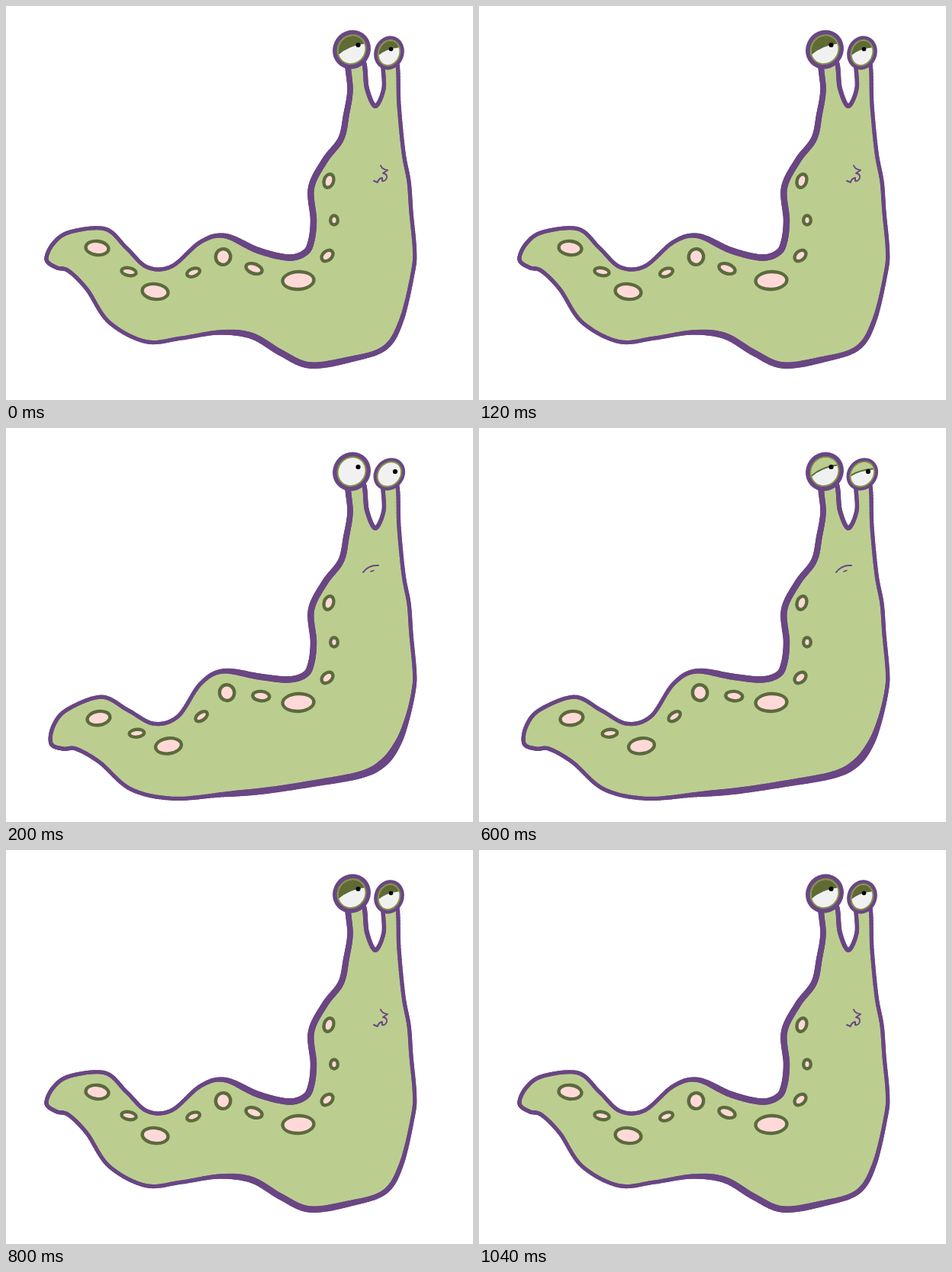
Write an HTML page with a canvas that moves like this. It is 612x516 px and loops after 1.2 s.

```html
<!DOCTYPE html>
<html lang="en">
<head>
<meta charset="utf-8">
<title>Slug</title>
<style>
html, body { margin: 0; width: 100%; height: 100%; overflow: hidden; background: #fff; }
canvas { display: block; }
</style>
</head>
<body>
<canvas id="stage" width="612" height="516"></canvas>
<script>
const ctx = document.getElementById('stage').getContext('2d');
const PURPLE = '#6a4684', GREEN = '#bbce90', OLIVE = '#5b6a3c', PINK = '#ffd9d7', RIM = '#809247', WHITE = '#f1f1f1';

// Key points of the outline, clockwise from the neck
const head = [
  [400,308],[403,280],[400,238],[418,202],[439,174],[446,142],[451,110],[449,72],[468,72],[473,108],
  [484,131],[495,108],[495,72],[512,72],[515,130],[521,192],[528,230],[531,270],[535.5,320]
];
const archedBelly = [[533,350],[518,412],[496,448],[450,463],[398,470.5],[360,454],[322,432],[280,427.5],[230,435]];
const flatBelly = [[534,345],[526,380],[514,412],[495,438],[465,454],[400,466],[340,475],[285,480]];
const tail = [
  [183,439.5],[135,414],[106,371],[82,347],[66,342.5],[53,332],[62,311],[84,296],[130,292],
  [158,317],[185,342],[217,341],[255,309],[287,301],[330,320],[370,329.5],[392,323]
];
// x, y, radii, tilt in degrees
const spots = [
  [423,229,6.2,9,18],[430,280.5,4.8,6,0],[421,327,8.5,6,-42],[383,359.5,20.5,11.5,-3],
  [119.5,317,15,9,6],[161,348,9.7,5,10],[195.5,374,17,10,7],[245.5,349,8.8,5,-20],
  [284.5,328.5,9.7,10.4,10],[325,344,11,6.2,20]
];

// Swing everything left of the hinge down by about 15 degrees
const HINGE = [351, 310], SWING = 0.2725;
const lower = ([x, y, rx, ry, tilt]) => x > HINGE[0] ? [x, y, rx, ry, tilt] :
  [x + SWING * (y - HINGE[1]), y + SWING * (HINGE[0] - x), rx, ry, tilt - 15];

// Cyclic Catmull-Rom spline
function smooth(pts, steps = 14) {
  const out = [], n = pts.length;
  for (let i = 0; i < n; i++) {
    const [a, b, c, d] = [-1, 0, 1, 2].map(k => pts[(i + k + n) % n]);
    for (let s = 0; s < steps; s++) {
      const t = s / steps;
      out.push([0, 1].map(k => b[k] + t / 2 * (c[k] - a[k] +
        t * (2 * a[k] - 5 * b[k] + 4 * c[k] - d[k] + t * (3 * (b[k] - c[k]) + d[k] - a[k])))));
    }
  }
  return out;
}

const arched = { outline: smooth([...head, ...archedBelly, ...tail]), spots, heel: 1.5 };
const flat = { outline: smooth([...head, ...flatBelly, ...tail.map(lower)]), spots: spots.map(lower), heel: 5 };

// The line swells around the middle and at the lower right corner
const penWidth = (x, y, heel) =>
  5.2 + 3.2 / (1 + ((x - 375) / 85) ** 8) + heel * Math.exp(-((x - 498) ** 2 + (y - 436) ** 2) / 2500);

function ellipse(x, y, rx, ry, deg, fill) {
  ctx.beginPath();
  ctx.ellipse(x, y, rx, ry, deg * Math.PI / 180, 0, 2 * Math.PI);
  ctx.fillStyle = fill;
  ctx.fill();
}

function line(path, color, width) {
  ctx.strokeStyle = color;
  ctx.lineWidth = width;
  ctx.stroke(new Path2D(path));
}

function drawBody({ outline, spots, heel }) {
  ctx.fillStyle = GREEN;
  ctx.fill(new Path2D('M' + outline.join('L')));
  outline.forEach(([x, y], i) => {
    line(`M${x} ${y}L${outline[(i + 1) % outline.length]}`, PURPLE, penWidth(x, y, heel));
  });
  for (const [x, y, rx, ry, tilt] of spots) {
    ellipse(x, y, rx + 2.2, ry + 2.2, tilt, OLIVE);
    ellipse(x, y, rx - 2.2, ry - 2.2, tilt, PINK);
  }
}

// lid: colour of the eyelid, edge: its lower curve
function drawEye([x, y, rx, ry, tilt, ring], [px, py, pr], lid, edge) {
  ellipse(x, y, rx, ry, tilt, PURPLE);
  ellipse(x, y, rx - ring, ry - ring, tilt, RIM);
  ctx.save();
  ellipse(x, y, rx - ring - 2, ry - ring - 2, tilt, WHITE);
  ctx.clip();
  if (lid) {
    ctx.fillStyle = lid;
    ctx.fill(new Path2D(edge + 'V20H' + (x - 30) + 'Z'));
    line(edge, OLIVE, 2);
  }
  ctx.restore();
  ellipse(px, py, pr, pr, 0, '#000');
}

function draw() {
  const t = performance.now() % 1200;
  const up = t < 200 || t >= 800;
  const lid = up ? '#5f6b32' : t >= 600 ? GREEN : null;
  ctx.fillStyle = '#fff';
  ctx.fillRect(0, 0, 612, 516);
  ctx.lineCap = ctx.lineJoin = 'round';

  drawBody(up ? arched : flat);
  drawEye([453, 57, 24.5, 26, 35, 5.5], [461.5, 51, 3.1], lid, 'M432 66Q448 50 474 48');
  if (up) {
    drawEye([502, 61.3, 19.5, 22.5, 20, 4.5], [504.5, 56.5, 2.8], lid, 'M483 68Q496 54 520 53');
    line('M491 209Q493 214 500 215L494 219Q500 220 499 225Q497 230 493 229L493 225Q488 226 487 231L482 229', PURPLE, 2);
  } else {
    drawEye([502.3, 60.5, 19.5, 22.5, 40, 4], [510, 57, 3.1], lid, 'M481 67Q495 54 523 53');
    line('M468 189Q475 179 488 180', PURPLE, 2);
    line('M478 188L482 186.5', PURPLE, 1.5);
  }
  requestAnimationFrame(draw);
}
draw();
</script>
</body>
</html>
```
